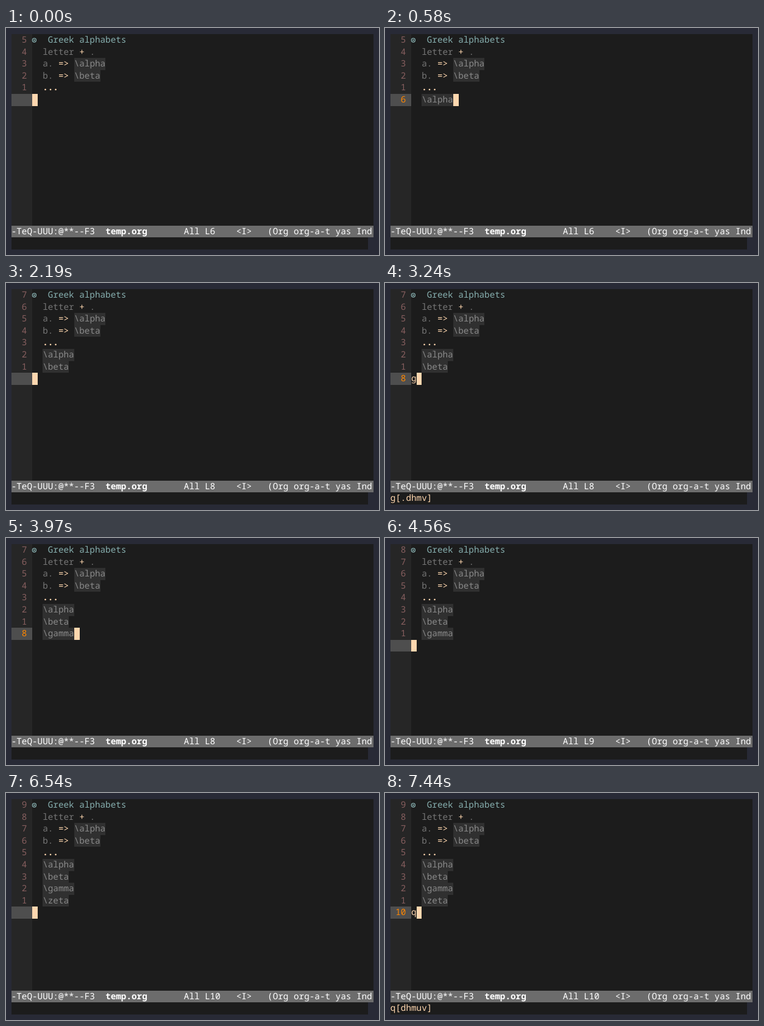
Write an HTML page that moves like this. It is 612x372 px and loops after 8 s.

```html
<!DOCTYPE html>
<html lang="en">
<head>
<meta charset="utf-8">
<title>Typing Greek letters</title>
<style>
  html, body { margin: 0; width: 100%; height: 100%; overflow: hidden; background: #282a36; }
  svg { display: block; }
  text {
    font: 14.3px "Noto Sans Mono", "DejaVu Sans Mono", monospace;
    white-space: pre;
    text-rendering: geometricPrecision;
    fill: #ffd7af;
  }
  .bold { font-weight: 700; }
  .num { fill: #875f5f; text-anchor: end; }
  .now { fill: #ff8700; text-anchor: end; }
  .dim { fill: #767676; }
  .tex { fill: #8a8a8a; }
  .head { fill: #87afaf; }
  .mode { fill: #fff; }
</style>
</head>
<body>
<svg id="stage" width="612" height="372" viewBox="0 0 612 372"></svg>
<script>
const LOOP = 8000, COL = 8.58, ROW = 19.6;
const MODE_ROW = 16, ECHO_ROW = 17, FIRST = 5;
const stageEl = document.getElementById('stage');

// When each key, its expansion and the following newline appear.
const entries = [
  { key: 'a', hint: '["\'.`dhmruv~]', tex: '\\alpha', at: [500, 580, 1290] },
  { key: 'b', hint: '[.dhmv]', tex: '\\beta', at: [1590, 1660, 2190] },
  { key: 'g', hint: '[.dhmv]', tex: '\\gamma', at: [3240, 3970, 4560] },
  { key: 'z', hint: '[.dhmv]', tex: '\\zeta', at: [5300, 5880, 6540] },
  { key: 'q', hint: '[dhmuv]', tex: '', at: [7440, LOOP, LOOP] }
];

const colX = col => Math.floor(9.2 + 8.6 * col);
const rowY = row => Math.round(10 + ROW * row);

const rect = (x, y, x2, y2, fill) =>
  `<rect x="${x}" y="${y}" width="${x2 - x}" height="${y2 - y}" fill="${fill}"/>`;

const cells = (row, from, to, fill) =>
  rect(colX(from), rowY(row), colX(to), rowY(row + 1), fill);

function text(row, col, str, cls = '') {
  const safe = str.replace(/&/g, '&amp;').replace(/</g, '&lt;').replace(/>/g, '&gt;');
  const x = (8.7 + COL * col).toFixed(2);
  return `<text x="${x}" y="${rowY(row) + 14}" class="${cls}">${safe}</text>`;
}

const macro = (row, col, str) =>
  cells(row, col, col + str.length, '#303030') + text(row, col, str, 'tex');

const rule = (row, letter, tex) =>
  text(row, 6, letter + '.', 'dim') + text(row, 9, '=>') + macro(row, 12, tex);

const backdrop =
  rect(0, 0, 612, 372, '#282a36') +
  rect(9, 10, 603, 324, '#1c1c1c') +
  rect(9, 10, 43, 324, '#262626') +
  rect(9, 324, 603, 343, '#6c6c6c') +
  rect(9, 343, 594, 363, '#1c1c1c') +
  '<circle cx="46.4" cy="20" r="3.1" fill="none" stroke="#87afaf" stroke-width="1.2"/>' +
  '<circle cx="46.4" cy="20" r="1.3" fill="#87afaf"/>' +
  text(0, 7, 'Greek alphabets', 'head') +
  text(1, 6, 'letter', 'dim') + text(1, 13, '+') + text(1, 15, '.', 'dim') +
  rule(2, 'a', '\\alpha') +
  rule(3, 'b', '\\beta') +
  text(4, 6, '...', 'bold') +
  text(MODE_ROW, 0, '-TeQ-UUU:@**--F3', 'mode') +
  text(MODE_ROW, 18, 'temp.org', 'mode bold') +
  text(MODE_ROW, 43, '<I>', 'mode') +
  text(MODE_ROW, 49, '(Org org-a-t yas Ind', 'mode');

function draw(done, step) {
  const row = FIRST + done;
  const { key, hint, tex } = entries[done];
  let out = backdrop + rect(9, rowY(row), 43, rowY(row + 1), '#4e4e4e');

  for (let r = 0; r < row; r++) out += text(r, 3, String(row - r), 'num');
  for (let i = 0; i < done; i++) out += macro(FIRST + i, 6, entries[i].tex);

  let cursor = 4;
  if (step > 0) out += text(row, 3, String(row + 1), 'now');
  if (step === 1) {
    out += text(row, 4, key) + text(ECHO_ROW, 0, key + hint);
    cursor = 5;
  } else if (step === 2) {
    out += macro(row, 6, tex);
    cursor = 6 + tex.length;
  }
  out += cells(row, cursor, cursor + 1, '#ffd7af');
  out += text(MODE_ROW, 33, 'All L' + (row + 1), 'mode');
  stageEl.innerHTML = out;
}

let shown = '';
function tick() {
  const t = performance.now() % LOOP;
  const done = entries.filter(e => t >= e.at[2]).length;
  const step = entries[done].at.filter(at => t >= at).length;
  const state = done + ':' + step;
  if (state !== shown) {
    shown = state;
    draw(done, step);
  }
  requestAnimationFrame(tick);
}
tick();
</script>
</body>
</html>
```
